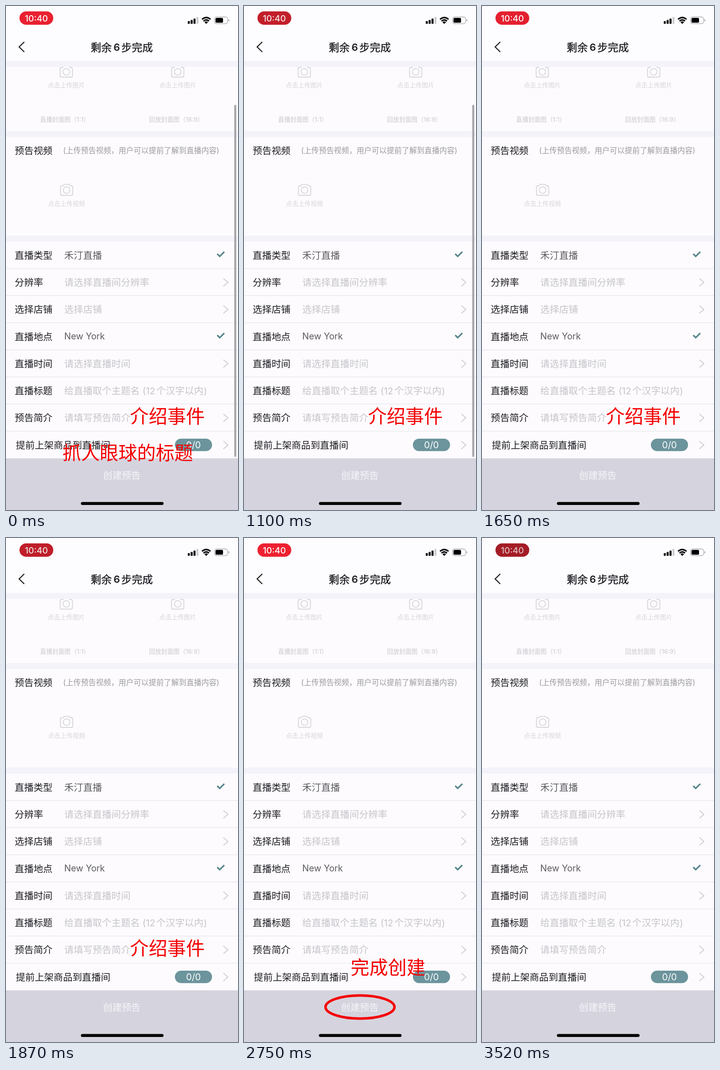
Write an HTML page that moves like this. It is 508x1102 px and loops after 3630 ms.

```html
<!DOCTYPE html>
<html lang="zh-CN">
<head>
<meta charset="utf-8">
<style>
  html, body { margin: 0; width: 100%; height: 100%; overflow: hidden; background: #fdfbfe; }
  svg { display: block; width: 100%; height: 100%; }
  text { font-family: Inter, "Noto Sans CJK SC", "Noto Sans CJK", sans-serif; white-space: pre; }
</style>
</head>
<body>
<svg id="stage" viewBox="0 0 508 1102"></svg>
<script>
const LOOP = 3630;
const INK = '#1c1b20', HINT = '#c5c4c9', FAINT = '#d6d5da', TEAL = '#55848b', RED = '#f40000';

// Text is placed by the vertical centre of its glyphs.
const text = (x, cy, size, fill, content, extra = '') =>
  `<text x="${x}" y="${cy + size * 0.38}" font-size="${size}" fill="${fill}" ${extra}>${content}</text>`;
const rect = (x, y, w, h, fill, r = 0, extra = '') =>
  `<rect x="${x}" y="${y}" width="${w}" height="${h}" rx="${r}" fill="${fill}" ${extra}/>`;
const line = (d, stroke, width, extra = '') =>
  `<path d="${d}" fill="none" stroke="${stroke}" stroke-width="${width}" ${extra}/>`;
const centred = 'text-anchor="middle"';

const camera = (x, y) => `<g transform="translate(${x} ${y})">` +
  line('M-10.5 -9.5H-8L-5.5 -12.7H5.5L8 -9.5H10.5Q13.5 -9.5 13.5 -6.5V8.5Q13.5 11.5 10.5 11.5H-10.5Q-13.5 11.5 -13.5 8.5V-6.5Q-13.5 -9.5 -10.5 -9.5Z', FAINT, 1.8) +
  `<circle r="7.2" fill="none" stroke="${FAINT}" stroke-width="1.8"/></g>`;
const arrow = y => line(`M476 ${y - 8.5}L486 ${y}L476 ${y + 8.5}`, '#cfced3', 2);
const tick = y => line(`M462.5 ${y - 2}L468 ${y + 3.5}L478 ${y - 6.5}`, TEAL, 3.2);

function uploads() {
  return camera(132, 144) + camera(376, 144) + camera(132.7, 402.5) +
    text(91.5, 173, 13.5, FAINT, '点击上传图片') +
    text(335.5, 173, 13.5, FAINT, '点击上传图片') +
    text(92, 432, 13.5, FAINT, '点击上传视频') +
    text(74.5, 248, 13.4, '#c9c8cd', '直播封面图（1:1）') +
    text(313, 248, 13.4, '#c9c8cd', '回放封面图（16:9）') +
    text(19, 316, 20.7, INK, '预告视频') +
    text(125, 316, 16.5, '#9b9a9f', '(上传预告视频，用户可以提前了解到直播内容)');
}

function header() {
  const bars = [6, 8.5, 11.5, 15].map((h, i) =>
    rect(398 + i * 6.3, 39 - h, 4.4, h, i < 3 ? '#000' : '#cbcace', 1.2)).join('');
  const wifi = line('M429.2 29.2Q438.5 21 447.8 29.2M432.5 33Q438.5 27.8 444.5 33', '#000', 3) +
    '<path d="M434.6 35.2Q438.5 32 442.4 35.2L438.5 39.2Z"/>';
  const battery = rect(456.6, 24, 28.8, 14.6, 'none', 4.5, 'stroke="#a9a8ad" stroke-width="1.3"') +
    rect(458.7, 26.1, 16.5, 10.4, '#000', 2.6) +
    '<path d="M487 28.8Q489.2 29.6 489.2 31.3T487 33.8Z" fill="#a9a8ad"/>';
  const heading = `font-weight="500" stroke="${INK}" stroke-width="0.4"`;
  return rect(0, 0, 508, 120, '#fdfcfe') +
    rect(29.5, 11.7, 74, 29.3, RED, 14.6, 'id="clockPill"') +
    text(66.5, 26.3, 19, '#fff', '10:40', `${centred} font-weight="500" id="clock"`) +
    bars + wifi + battery +
    line('M40 78.5L28.8 89.5L40 100.5', '#222', 2.4) +
    text(185.5, 90, 23, INK, '剩余', heading) +
    text(242.5, 90, 22, INK, '6', `${centred} font-weight="600"`) +
    text(252.5, 90, 23, INK, '步完成', heading);
}

function form() {
  const rows = [
    ['直播类型', '禾汀直播', tick],
    ['分辨率', '请选择直播间分辨率', arrow],
    ['选择店铺', '选择店铺', arrow],
    ['直播地点', 'New York', tick],
    ['直播时间', '请选择直播时间', arrow],
    ['直播标题', '给直播取个主题名', null],
    ['预告简介', '请填写预告简介', arrow],
  ];
  const rowY = i => 545 + i * 59.25;
  return rows.map(([label, value, mark], i) => {
    const y = rowY(i), filled = mark === tick, latin = value === 'New York';
    return text(19, y, 20.7, INK, label) +
      text(127.5, latin ? y - 1 : y, latin ? 19.5 : 20.7, filled ? '#5c5b60' : HINT, value) +
      (mark ? mark(filled ? y - 1 : y) : '') +
      rect(0, y + 28.4, 508, 1.3, '#e6e5ea');
  }).join('') +
    text(299, rowY(5), 20, HINT, '(12') +
    text(329, rowY(5), 20.7, HINT, '个汉字以内') +
    text(433, rowY(5), 20, HINT, ')') +
    text(21.5, 960, 20.7, INK, '提前上架商品到直播间') +
    rect(369.8, 946, 81.4, 27.2, '#6c949c', 13.6) +
    text(410.5, 959.5, 20, '#fff', '0/0', centred) +
    arrow(960);
}

const caption = (id, x, cy, content, extra = '') =>
  `<g id="${id}">${text(x, cy, 40.9, RED, content)}${extra}</g>`;

document.getElementById('stage').innerHTML =
  rect(0, 0, 508, 1102, '#fdfbfe') +
  uploads() + header() +
  [120, 273.5, 502].map(y => rect(0, y, 508, 13, '#f4f3fa')).join('') +
  form() +
  rect(499.8, 216, 4.4, 770, '#a6a5aa', 2.2, 'id="scrollbar"') +
  rect(0, 989, 508, 113, '#d5d4de') +
  text(253.5, 1026, 20.6, '#f6f5fa', '创建预告', centred) +
  rect(164, 1084.5, 181, 6.5, '#000', 3.25) +
  caption('titleNote', 123.5, 976.5, '抓人眼球的标题') +
  caption('introNote', 271.5, 896.5, '介绍事件') +
  caption('doneNote', 233.5, 938.5, '完成创建',
    `<ellipse cx="254" cy="1025.5" rx="75.5" ry="25.3" fill="none" stroke="${RED}" stroke-width="5.6"/>`);

const el = id => document.getElementById(id);
const show = (id, on) => el(id).setAttribute('visibility', on ? 'visible' : 'hidden');
const mix = (a, b, k) => `rgb(${a.map((v, i) => Math.round(v + (b[i] - v) * k))})`;

function draw(now) {
  const t = Math.floor(now % LOOP / 110) * 110;
  // The clock badge breathes between bright and dark red.
  const dim = (1 - Math.cos(2 * Math.PI * (t / 1340 - 0.1))) / 2;
  el('clockPill').setAttribute('fill', mix([240, 33, 49], [163, 28, 38], dim));
  el('clock').setAttribute('fill', mix([255, 255, 255], [222, 188, 191], dim ** 2));
  el('scrollbar').setAttribute('opacity', Math.max(0, Math.min(1, (1540 - t) / 330)));
  show('titleNote', t < 220);
  show('introNote', t < 1980);
  show('doneNote', t >= 1980 && t < 3300);
}

function animate(now) {
  draw(now);
  requestAnimationFrame(animate);
}
draw(0);
requestAnimationFrame(animate);
</script>
</body>
</html>
```
